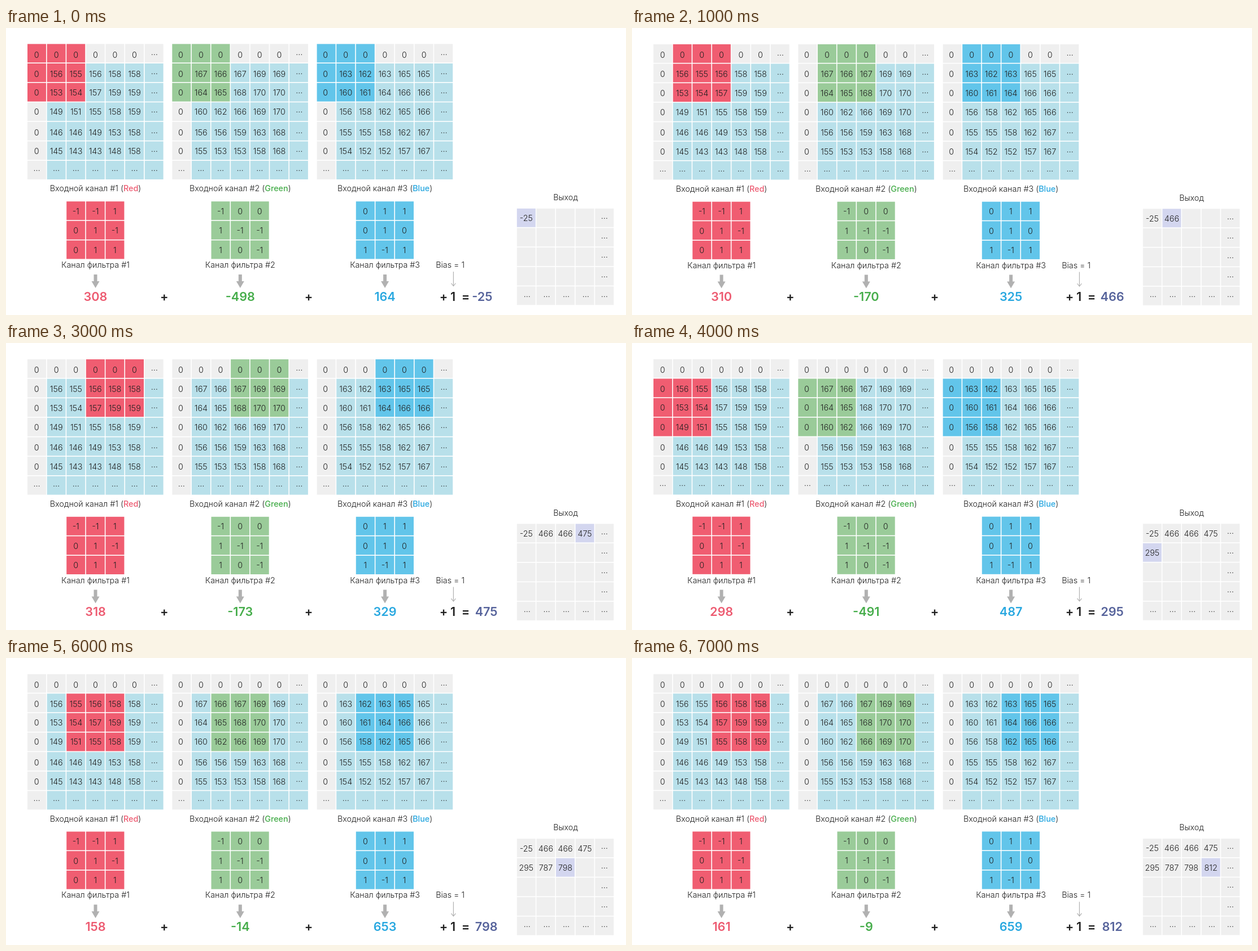
These frames come from a looping animation (1098x510 px, 10000 ms). An HTML page:

```html
<!DOCTYPE html>
<html lang="ru">
<head>
<meta charset="utf-8">
<style>
  html, body { margin: 0; width: 100%; height: 100%; overflow: hidden; background: #fff; }
  svg { display: block; width: 1098px; height: 510px; }
  text { font: 300 14.3px Inter, sans-serif; fill: #202020; text-anchor: middle; white-space: pre; }
  .big { font-size: 21.6px; font-weight: 600; }
  tspan { font-weight: 500; }
</style>
</head>
<body>
<svg id="stage" viewBox="0 0 1098 510"></svg>
<script>
const PITCH = 34.6, CELL = 33, STEP_MS = 1000, LOOP_MS = 10000;
const GREY = '#efefef', CYAN = '#b8e0ea', LILAC = '#d3d6ef', ARROW = '#b1b1b1';
const ROW_TEXT_Y = [47.4, 81.4, 114.9, 149, 185.5, 219.2, 253];
// Slight vertical drift of the whole picture from step to step.
const DRIFT = [0, .5, .6, .6, .4, .3, .3, .2];

const table = rows => rows.split('/').map(row => row.trim().split(' '));

const channels = [
  {
    name: 'Red', x: 38, zeroShift: -.4, fill: '#f05d71', ink: '#ed5b71',
    pixels: table('156 155 156 158 158/153 154 157 159 159/149 151 155 158 159/146 146 149 153 158/145 143 143 148 158'),
    kernel: table('-1 -1 1/0 1 -1/0 1 1'),
    sums: [308, 310, 314, 318, 298, 148, 158, 161]
  },
  {
    name: 'Green', x: 294.3, zeroShift: -1.3, fill: '#9acb99', ink: '#46ad4b',
    pixels: table('167 166 167 169 169/164 165 168 170 170/160 162 166 169 170/156 156 159 163 168/155 153 153 158 168'),
    kernel: table('-1 0 0/1 -1 -1/1 0 -1'),
    sums: [-498, -170, -175, -173, -491, -8, -14, -9]
  },
  {
    name: 'Blue', x: 550.6, zeroShift: -1.5, fill: '#62c5ea', ink: '#29a8e0',
    pixels: table('163 162 163 165 165/160 161 164 166 166/156 158 162 165 166/155 155 158 162 167/154 152 152 157 167'),
    kernel: table('0 1 1/0 1 0/1 -1 1'),
    sums: [164, 325, 326, 329, 487, 646, 653, 659]
  }
];
const outputs = channels[0].sums.map((_, i) => channels.reduce((sum, c) => sum + c.sums[i], 1));

const rect = (x, y, fill) => `<rect x="${x}" y="${y}" width="${CELL}" height="${CELL}" fill="${fill}"/>`;

// Text centred on (x, y); an ellipsis sits on its dots instead.
const label = (x, y, content) =>
  `<text x="${x}" y="${y + (content === '…' ? 1 : 5.2)}">${content}</text>`;

const big = (x, y, content, ink = '#202020') =>
  `<text class="big" x="${x}" y="${y + 7.9}" style="fill:${ink}">${content}</text>`;

function grid(size, x, y, cell) {
  let svg = '';
  for (let row = 0; row < size; row++) {
    for (let col = 0; col < size; col++) {
      const left = x + col * PITCH, top = y + row * PITCH;
      const { fill, value, dx = 0, textY = top + CELL / 2 + .8 } = cell(row, col);
      svg += rect(left, top, fill);
      if (value !== undefined) svg += label(left + CELL / 2 + dx, textY, value);
    }
  }
  return svg;
}

function drawChannel(channel, index, step) {
  const { name, x, zeroShift, fill, ink, pixels, kernel, sums } = channel;
  const windowRow = Math.floor(step / 4), windowCol = step % 4;
  const mid = x + 120.5;

  const input = grid(7, x, 28.4, (row, col) => {
    const active = row >= windowRow && row < windowRow + 3 && col >= windowCol && col < windowCol + 3;
    const border = row === 0 || col === 0;
    const edge = row === 6 || col === 6;
    return {
      fill: active ? fill : border ? GREY : CYAN,
      value: edge ? '…' : border ? '0' : pixels[row - 1][col - 1],
      dx: col === 6 ? .8 : col === 0 && row < 6 ? zeroShift : 0,
      textY: ROW_TEXT_Y[row]
    };
  });
  const filter = grid(3, x + 2 * PITCH, 308.2, (row, col) => ({ fill, value: kernel[row][col] }));

  return input + filter +
    label(mid, 285.2, `Входной канал #${index + 1} (<tspan fill="${ink}" style="fill:${ink}">${name}</tspan>)`) +
    label(mid, 421, `Канал фильтра #${index + 1}`) +
    `<path d="M${mid - 3} 438h6v12h4l-7 12l-7 -12h4z" fill="${ARROW}"/>` +
    big(mid, 477, sums[step], ink);
}

function drawOutput(step) {
  return label(991, 301, 'Выход') + grid(5, 904.8, 320.8, (row, col) => {
    const edge = row === 4 || col === 4;
    const index = row * 4 + col;
    return {
      fill: !edge && index === step ? LILAC : GREY,
      value: edge ? '…' : index <= step ? outputs[index] : undefined,
      dx: row === 4 && col < 4 ? 1.6 : 0
    };
  });
}

function drawStep(step) {
  const result = outputs[step];
  return `<g transform="translate(0 ${DRIFT[step]})">` +
    channels.map((channel, i) => drawChannel(channel, i, step)).join('') +
    big(280.3, 477, '+') + big(536, 477, '+') +
    big(775, 477, '+') + big(791.5, 477, '1') + big(814, 477, '=') +
    big(result < 0 ? 843.3 : 850.6, 477, result, '#56639b') +
    label(786.7, 421, 'Bias = 1') +
    `<path d="M792.4 433v25M788.4 453.5l4 5l4 -5" fill="none" stroke="${ARROW}" stroke-width="1.2"/>` +
    drawOutput(step) + '</g>';
}

const stage = document.getElementById('stage');
const start = performance.now();
let shown = -1;

function frame() {
  const time = (performance.now() - start) % LOOP_MS;
  const step = Math.min(Math.floor(time / STEP_MS), outputs.length - 1);
  if (step !== shown) stage.innerHTML = drawStep(shown = step);
  requestAnimationFrame(frame);
}
frame();
</script>
</body>
</html>
```
